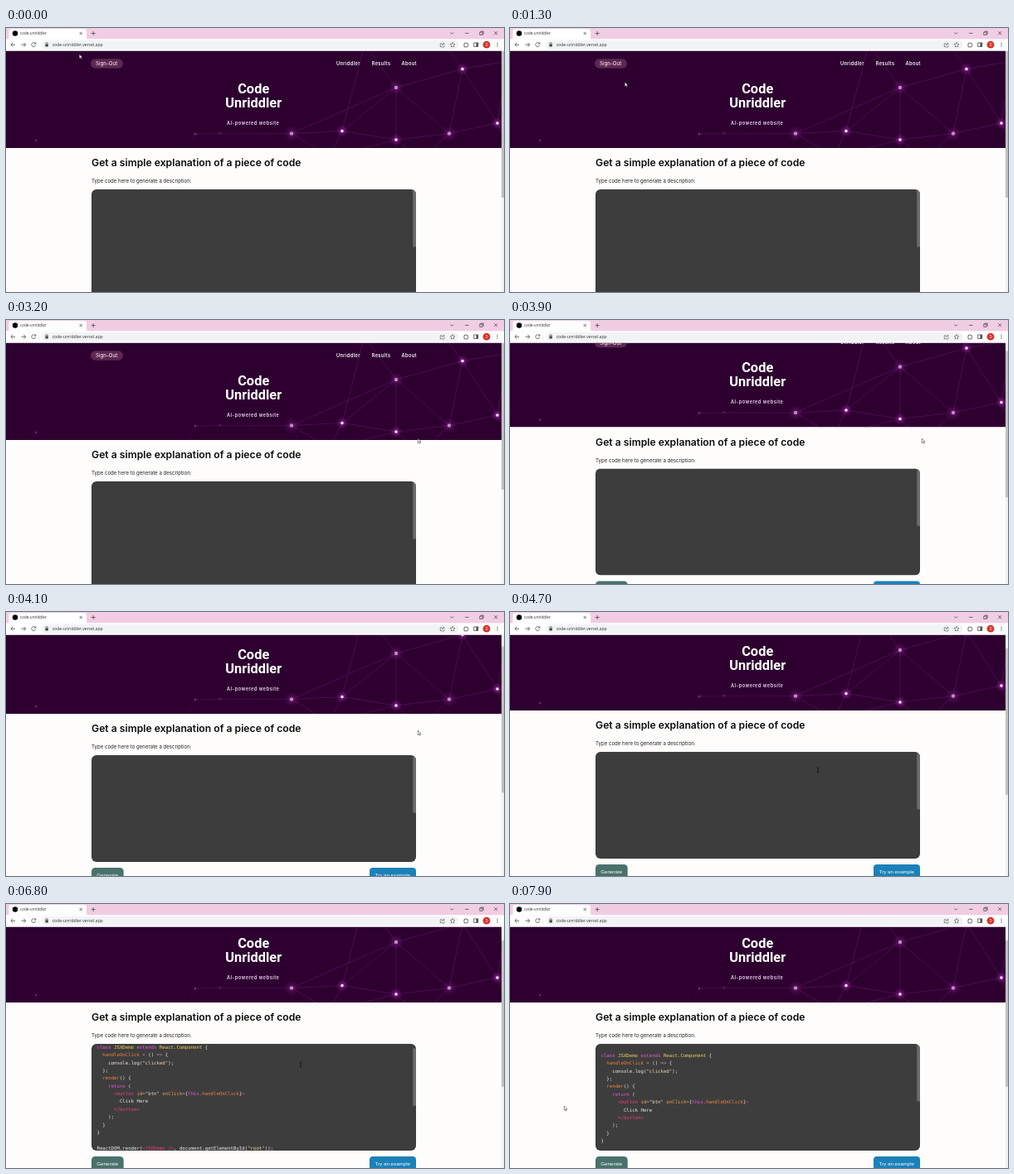
Write an HTML page that moves like this. It is 600x319 px and loops after 8000 ms.

```html
<!DOCTYPE html>
<html lang="en">
<head>
<meta charset="utf-8">
<title>code-unriddler</title>
<style>
  html, body { margin: 0; width: 100%; height: 100%; overflow: hidden; background: #fefdfc; }
  svg { display: block; width: 100vw; height: 100vh; }
  .ui { font-family: "Open Sans", sans-serif; }
  .body { font-family: Inter, sans-serif; }
  .btn { font: 6.2px "Liberation Sans", Arial, sans-serif; fill: #fff; }
  .code { font: 5.7px "DejaVu Sans Mono", monospace; white-space: pre; }
  .nav { font-size: 5.6px; font-weight: 600; letter-spacing: .4px; fill: #fff; }
  .icon { fill: none; stroke: #4a4d51; stroke-width: .8; }
</style>
</head>
<body>
<svg viewBox="0 0 600 319" preserveAspectRatio="none">
  <defs>
    <clipPath id="view"><rect y="27.5" width="597" height="292"/></clipPath>
    <clipPath id="box"><rect x="103" y="195" width="391" height="129" rx="6"/></clipPath>
    <clipPath id="hero"><rect y="27" width="597" height="118"/></clipPath>
    <radialGradient id="glow">
      <stop offset="0" stop-color="#b03cb4" stop-opacity=".75"/>
      <stop offset="1" stop-color="#7a1080" stop-opacity="0"/>
    </radialGradient>
  </defs>

  <rect width="600" height="319" fill="#fefdfc"/>

  <g clip-path="url(#view)">
    <g id="page" class="body">
      <g clip-path="url(#hero)">
        <rect y="27" width="597" height="118" fill="#2d0030"/>
        <g id="net"></g>
      </g>
      <rect x="102" y="37.3" width="39" height="11.4" rx="5.7" fill="#5e2753"/>
      <text x="108" y="45.2" font-size="6.2" fill="#fff">Sign-Out</text>
      <g class="nav">
        <text x="398" y="45">Unriddler</text>
        <text x="440.7" y="45">Results</text>
        <text x="476.6" y="45">About</text>
      </g>
      <g font-family="Roboto, sans-serif" font-weight="700" font-size="16.4" fill="#fff" text-anchor="middle">
        <text x="298.2" y="79">Code</text>
        <text x="298.2" y="95.6">Unriddler</text>
      </g>
      <text x="266" y="116.8" font-size="5.6" font-weight="600" letter-spacing=".5" fill="#f0d8f2">AI-powered website</text>
      <text x="103" y="167.2" font-size="12.2" font-weight="600" fill="#0c0c0c">Get a simple explanation of a piece of code</text>
      <text x="103" y="187.2" font-size="6.1" fill="#222">Type code here to generate a description:</text>

      <g clip-path="url(#box)">
        <rect x="103" y="195" width="391" height="129" fill="#3d3d3d"/>
        <g id="code" class="code"></g>
        <rect id="boxThumb" x="490.3" y="195" width="3.7" height="69.5" fill="#6b6b6b"/>
      </g>
      <rect x="103" y="331" width="38.7" height="19" rx="4.5" fill="#4a716c"/>
      <text class="btn" x="109.3" y="342.4">Generate</text>
      <rect id="tryBtn" x="438" y="331" width="56" height="19" rx="4" fill="#1b81b9"/>
      <text class="btn" x="444.6" y="342.4">Try an example</text>
    </g>
  </g>

  <rect x="597" y="27" width="3" height="292" fill="#f3f2f2"/>
  <rect id="thumb" x="597" y="28" width="3" height="177" fill="#c2c1c1"/>

  <g class="ui">
    <rect width="600" height="14" fill="#f1cde3"/>
    <path d="M1 13.5Q3.500 13.500 3.500 11V3.500Q3.500 1 6 1H94.500Q97 1 97 3.500V11Q97 13.500 99.500 13.500Z" fill="#fff"/>
    <rect y="13.300" width="600" height="14.200" fill="#fff"/>
    <circle cx="11" cy="6.500" r="3.200" fill="#000"/>
    <text x="17" y="8.300" font-size="4.600" fill="#333">code-unriddler</text>
    <rect x="43" y="14.900" width="503" height="10.800" rx="5.400" fill="#f1f3f4"/>
    <text x="55.700" y="22.300" font-size="5.100" fill="#333">code-unriddler.vercel.app</text>
    <g class="icon">
      <path d="M88.700 4.900l3.200 3.200m0-3.200l-3.200 3.200M102.700 6.500h5m-2.500-2.500v5"/>
      <path d="M535.300 5.400l1.900 1.900 1.900-1.900M553 6.300h4.500M570.800 5h3.300v3.300h-3.300zM572 5v-1h3.200v3.200h-1M588.200 4.200l4 4m0-4l-4 4"/>
      <path d="M11.200 20.200H6m2.300-2.400L6 20.200l2.300 2.400M18.500 20.200h5.200m-2.300-2.400l2.300 2.400-2.300 2.400"/>
      <path d="M35.300 18.600a2.500 2.500 0 1 0 .4 2.400M35.800 17.300v1.900h-1.900"/>
      <path d="M48 19.800v-1a1.100 1.100 0 0 1 2.200 0v1"/>
      <path d="M525.500 18.700h-2.200v4.200h4.800v-1.700M525 21.300q.4-2.300 3-2.300m-1.300-1.500l1.500 1.500-1.500 1.500" stroke-width=".6"/>
      <path d="M538 17.300l.9 2 2.100.2-1.600 1.400.5 2.100-1.900-1.100-1.900 1.100.5-2.100-1.600-1.400 2.100-.2z" stroke-width=".6"/>
      <path d="M552 18.500h1.300a.8.8 0 0 1 1.600 0h1.300v1.400a.8.8 0 0 1 0 1.600v1.400H552z"/>
      <path d="M563.700 17.900h5v4.600h-5z"/>
    </g>
    <rect x="47.300" y="19.600" width="3.600" height="3" rx=".4" fill="#4a4d51"/>
    <rect x="566.500" y="17.900" width="2.400" height="4.600" fill="#4a4d51"/>
    <circle cx="579" cy="20.200" r="4.400" fill="#d5322a"/>
    <text x="579" y="21.800" font-size="4.400" fill="#fff" text-anchor="middle">D</text>
    <g fill="#4a4d51"><circle cx="592" cy="18.200" r=".6"/><circle cx="592" cy="20.200" r=".6"/><circle cx="592" cy="22.200" r=".6"/></g>
  </g>

  <g id="cursor">
    <path id="arrow" d="M0 0V5.300L1.250 4.150 2 6 2.900 5.600 2.150 3.850H3.800Z" fill="#fff" stroke="#111" stroke-width=".45"/>
    <path id="beam" d="M-1-2.800H1M-1 2.800H1M0-2.800V2.800" fill="none" stroke="#0c0c0c" stroke-width=".7"/>
    <path id="hand" d="M-.6.500Q0-.4.600.500V2.600L2.700 3.200Q3.200 3.500 3 4.300L2.500 6.400H-.8L-2.300 4.100Q-2-.3.400-.6 4.200Z" fill="#fff" stroke="#111" stroke-width=".45"/>
  </g>
</svg>

<script>
const LOOP = 8000;
const CODE_AT = 5950;
const $ = id => document.getElementById(id);

// Hero network: x, y, radius, opacity
const nodes = [
  [550, 49.5, 1.7, 1], [470, 72, 2.2, .55], [405, 124.5, 1.7, 1], [344, 127.5, 2.2, .55],
  [470, 135, 1.7, 1], [534, 127.5, 2.2, .55], [592, 115, 1.7, 1],
  [228, 128, 1, .25], [258, 127, .8, .2], [36, 136, 1, .2],
  [432, 20, 0, 0], [528, 20, 0, 0], [605, 40, 0, 0], [500, 160, 0, 0],
  [390, 155, 0, 0], [215, 155, 0, 0], [605, 145, 0, 0], [20, 155, 0, 0]
];
const links = "0-1 0-5 0-6 0-11 0-12 1-2 1-3 1-4 1-5 1-10 2-3 2-4 2-10 2-14 4-5 4-13 4-14 5-6 5-13 6-16 6-12 3-7 3-8 7-15 7-8 3-14 9-17";
$("net").innerHTML =
  links.split(" ").map(l => {
    const [a, b] = l.split("-").map(i => nodes[i]);
    const dim = Math.min(a[0], b[0]) < 300 ? .3 : .65;
    return `<path d="M${a[0]} ${a[1]}L${b[0]} ${b[1]}" stroke="#861a8a" stroke-width=".6" opacity="${dim}"/>`;
  }).join("") +
  nodes.filter(n => n[2]).map(([x, y, r, o]) =>
    `<circle cx="${x}" cy="${y}" r="${r * 4.5}" fill="url(#glow)" opacity="${o}"/>` +
    `<circle cx="${x}" cy="${y}" r="${r}" fill="#fbeefb" opacity="${o}"/>`).join("");

// Code sample with simple highlighting
const sample = `class JSXDemo extends React.Component {
  handleOnClick = () => {
    console.log("clicked");
  };
  render() {
    return (
      <button id="btn" onClick={this.handleOnClick}>
        Click Here
      </button>
    );
  }
}

ReactDOM.render(<JSXDemo />, document.getElementById("root"));`;
const rules = [
  [/^(class|extends|return|this)\b/, "#ee55dc"],
  [/^<\/?\w+|^\/?>(?=,|$)/, "#ec3f7c"],
  [/^(JSXDemo|React\.Component)\b/, "#f5d060"],
  [/^(\.?handleOnClick|render(?=\(\)))/, "#ee8440"],
  [/^(id|onClick)(?==)/, "#f0a04a"],
  [/^"[^"]*"/, "#f1dca8"],
  [/^=>?/, "#d88ab0"],
  [/^\w+|^\s+|^./, "#ececec"]
];
const esc = s => s.replace(/&/g, "&amp;").replace(/</g, "&lt;");
function paint(line) {
  let out = "";
  while (line) {
    const [re, color] = rules.find(([r]) => r.test(line));
    const tok = line.match(re)[0];
    out += `<tspan fill="${color}">${esc(tok)}</tspan>`;
    line = line.slice(tok.length);
  }
  return out;
}
$("code").innerHTML = sample.split("\n").map((line, i) => {
  const pad = line.search(/\S|$/);
  return `<text x="${109.5 + pad * 3.43}" y="${211 + i * 9.36}">${paint(line.slice(pad))}</text>`;
}).join("");

// Tracks: [time, value...]; eased between neighbours
const pointer = [
  [0, 88.3, 31.7], [300, 88.3, 31.7], [1300, 138.3, 65.5], [1700, 145, 68], [2600, 496.3, 143.3],
  [4450, 496.3, 143.3], [4700, 371, 191], [5250, 470, 308.5], [6100, 470, 308.5],
  [6600, 355, 193.5], [7350, 355, 193.5], [7700, 112, 236], [7900, 65.3, 244], [8000, 65.3, 244]
];
const pageScroll = [[3500, 0], [4100, 22], [4400, 26]];
const boxScroll = [[6600, 0], [6800, 10], [7000, 18], [7150, 18], [7400, 0]];

function at(track, t) {
  if (t <= track[0][0]) return track[0].slice(1);
  for (let i = 1; i < track.length; i++) {
    const a = track[i - 1], b = track[i];
    if (t <= b[0]) {
      const k = (t - a[0]) / (b[0] - a[0]);
      const e = (k + k * k * (3 - 2 * k)) / 2;
      return a.slice(1).map((v, j) => v + (b[j + 1] - v) * e);
    }
  }
  return track[track.length - 1].slice(1);
}
const move = (id, x, y) => $(id).setAttribute("transform", `translate(${x} ${y})`);
const show = (id, on) => $(id).setAttribute("visibility", on ? "visible" : "hidden");
const inside = (x, y, l, t, r, b) => x > l && x < r && y > t && y < b;

function draw(t) {
  const [x, y] = at(pointer, t);
  const [sy] = at(pageScroll, t);
  const [by] = at(boxScroll, t);
  const py = y + sy;

  move("page", 0, -sy);
  move("thumb", 0, sy * .61);
  move("code", 0, -by);
  move("boxThumb", 0, by * .54);
  show("code", t >= CODE_AT);

  const overTry = inside(x, py, 438, 331, 494, 350);
  const hand = overTry || inside(x, py, 102, 37, 141, 49);
  const beam = inside(x, py, 103, 195, 490, 324);
  move("cursor", x, y);
  show("hand", hand);
  show("beam", beam);
  show("arrow", !hand && !beam);
}

const start = performance.now();
function tick() {
  draw((performance.now() - start) % LOOP);
  requestAnimationFrame(tick);
}
draw(0);
tick();
</script>
</body>
</html>
```
